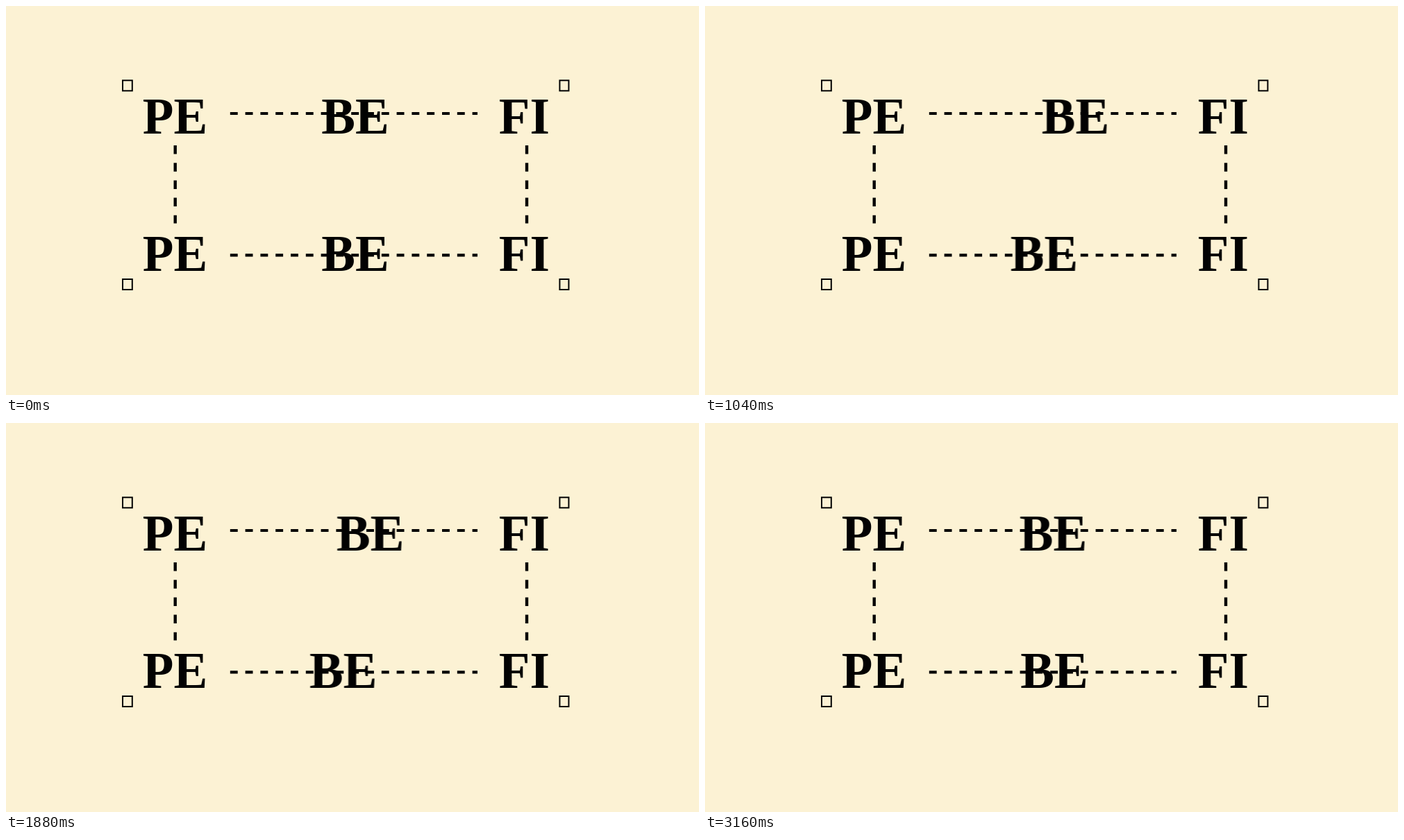
Animation of 998 by 561 pixels, one loop 3320 ms. Source, as an HTML page:

```html
<!DOCTYPE html>
<html lang="en">
<head>
<meta charset="utf-8">
<title>Syllables</title>
<style>
  html, body {
    margin: 0;
    width: 100%;
    height: 100%;
    overflow: hidden;
    background: #fcf2d4;
  }
  svg {
    display: block;
    width: 100%;
    height: 100%;
  }
  text {
    font: bold 73px "Liberation Serif", "Times New Roman", serif;
    fill: #020202;
  }
  .lines, .corners {
    fill: none;
    stroke: #020202;
  }
  .across { stroke-width: 4.2; stroke-dasharray: 10.9 10.9; }
  .down { stroke-width: 4.4; stroke-dasharray: 12.5 12.7; }
  .corners { stroke-width: 2; }

  .slide-top, .slide-bottom, .rise, .drop {
    animation: 3320ms ease-in-out infinite;
  }
  .slide-top { animation-name: slide-top; }
  .slide-bottom { animation-name: slide-bottom; }
  .rise { --travel: -196px; animation-name: visit; }
  .drop { --travel: 196px; animation-name: visit; }

  @keyframes slide-top {
    0% { transform: translateX(0); }
    18.072%, 19.277% { transform: translateX(-138.5px); }
    40.964% { transform: translateX(144.5px); }
    62.651%, 100% { transform: translateX(-1.5px); }
  }
  @keyframes slide-bottom {
    0% { transform: translateX(0); }
    20.181% { transform: translateX(130.5px); }
    39.608%, 40.361% { transform: translateX(-100.5px); }
    63.253%, 100% { transform: translateX(0); }
  }
  /* quick trip to the other row, slower return */
  @keyframes visit {
    0%, 69.729% { transform: translateY(0); }
    78.313% { transform: translateY(var(--travel)); }
    95.181%, 100% { transform: translateY(0); }
  }
</style>
</head>
<body>
<svg viewBox="0 0 998 561">
  <g class="corners">
    <rect x="168" y="107.3" width="13.8" height="15"/>
    <rect x="797.4" y="107.3" width="13" height="15"/>
    <rect x="168" y="394" width="13.8" height="15"/>
    <rect x="797.4" y="394" width="13" height="15"/>
  </g>

  <text x="196.8" y="183.5">PE</text>
  <text class="slide-top" x="454.3" y="183.5">BE</text>
  <text class="drop" x="709.8" y="183.5">FI</text>

  <text class="rise" x="196.8" y="381.5">PE</text>
  <text class="slide-bottom" x="454.3" y="381.5">BE</text>
  <text x="709.8" y="381.5">FI</text>

  <g class="lines">
    <path class="across" d="M322.8 155H679M322.8 359.3H679"/>
    <path class="down" d="M243.7 201V313.6M750 201V313.6"/>
  </g>
</svg>
</body>
</html>
```
